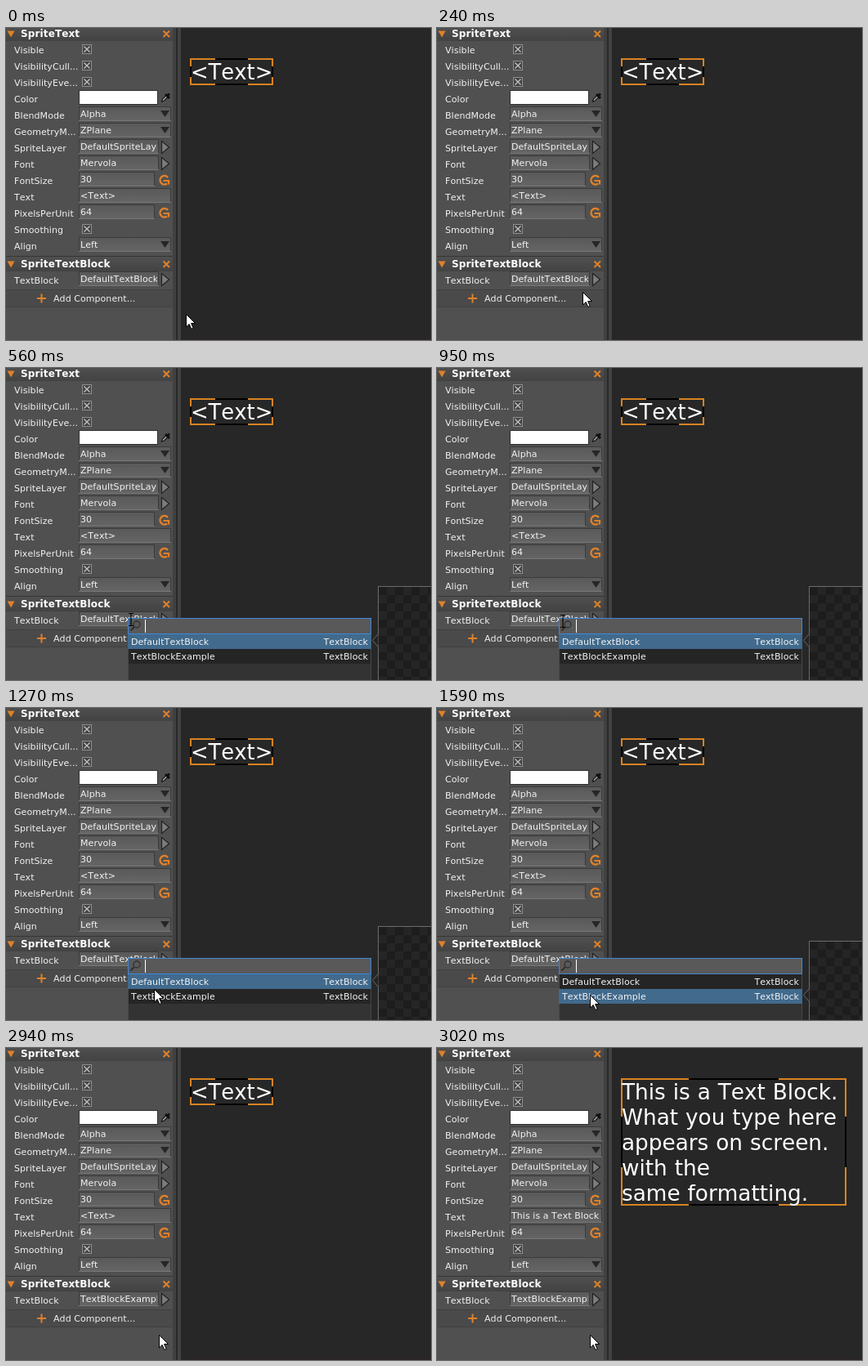
Animation of 520 by 382 pixels, one loop 3.72 s. Source, as an HTML page:

```html
<!DOCTYPE html>
<html lang="en">
<head>
<meta charset="utf-8">
<title>Text block inspector</title>
<style>
  html, body { margin: 0; width: 100%; height: 100%; overflow: hidden; background: #272727; }
  svg { display: block; }
  text { font: 11px "DejaVu Sans", sans-serif; font-kerning: none; font-variant-ligatures: none; letter-spacing: .06px; fill: #f2f2f2; white-space: pre; }
  .head { font-weight: bold; font-size: 12px; letter-spacing: .13px; fill: #fff; }
  .big { font-size: 26.3px; letter-spacing: 0; word-spacing: .6px; fill: #fff; }
  .title { font-size: 25.8px; letter-spacing: 0; fill: #fff; }
  .end { text-anchor: end; }
  .hint { fill: #a0a0a0; }
  .crisp { shape-rendering: crispEdges; }

  .anim { animation: 3720ms step-end infinite; }
  .focus { animation-name: focus; }
  .popup { animation-name: popup; }
  .typing { animation-name: typing; }
  .idle { animation-name: idle; }
  .pick { animation-name: pick; }
  .oldName { animation-name: oldName; }
  .newName { animation-name: newName; }
  .before { animation-name: before; }
  .after { animation-name: after; }
  .pointer { animation-name: pointer; }
  .arrow { animation-name: arrow; }
  .beam { animation-name: beam; }

  @keyframes focus { 0%, 15.05%, 100% { opacity: 0 } 12.9% { opacity: 1 } }
  @keyframes popup { 0%, 79.03%, 100% { opacity: 0 } 15.05% { opacity: 1 } }
  @keyframes typing { 0% { opacity: 1 } 70.43%, 100% { opacity: 0 } }
  @keyframes idle { 0% { opacity: 0 } 70.43%, 100% { opacity: 1 } }
  @keyframes pick { 0% { transform: translateY(0) } 36.29%, 100% { transform: translateY(18px) } }
  @keyframes oldName { 0% { opacity: 1 } 79.03%, 100% { opacity: 0 } }
  @keyframes newName { 0% { opacity: 0 } 79.03%, 100% { opacity: 1 } }
  @keyframes before { 0% { opacity: 1 } 81.18%, 100% { opacity: 0 } }
  @keyframes after { 0% { opacity: 0 } 81.18%, 100% { opacity: 1 } }
  @keyframes pointer {
    0% { transform: translate(220px, 350px) }
    2.15% { transform: translate(216px, 348px) }
    4.3% { transform: translate(200px, 338px) }
    6.45% { transform: translate(178px, 323px) }
    8.6% { transform: translate(160px, 311px) }
    10.75% { transform: translate(153px, 308px) }
    25.53% { transform: translate(154px, 310px) }
    27.68% { transform: translate(160px, 318px) }
    29.83% { transform: translate(168px, 328px) }
    31.98% { transform: translate(176px, 338px) }
    34.13% { transform: translate(181px, 344px) }
    36.29% { transform: translate(183px, 346px) }
    38.44% { transform: translate(184px, 348px) }
    40.59% { transform: translate(186px, 350px) }
    42.74%, 100% { transform: translate(187px, 351px) }
  }
  @keyframes arrow { 0%, 29.83%, 100% { opacity: 1 } 8.6% { opacity: 0 } }
  @keyframes beam { 0%, 29.83%, 100% { opacity: 0 } 8.6% { opacity: 1 } }
</style>
</head>
<body>
<svg id="stage" width="520" height="382" viewBox="0 0 520 382"></svg>
<script>
const ORANGE = '#e0812a';

const rect = (x, y, w, h, fill, more = '') =>
  `<rect class="crisp" x="${x}" y="${y}" width="${w}" height="${h}" fill="${fill}" ${more}/>`;
const frame = (x, y, w, h, fill, stroke) =>
  rect(x + .5, y + .5, w - 1, h - 1, fill, `stroke="${stroke}"`);
const path = (d, fill, stroke = 'none', width = 1) =>
  `<path d="${d}" fill="${fill}" stroke="${stroke}" stroke-width="${width}"/>`;
const text = (x, y, s, cls = '') =>
  `<text x="${x}" y="${y}" class="${cls}">${s.replace(/</g, '&lt;')}</text>`;
const anim = (name, body) => `<g class="anim ${name}">${body}</g>`;
const clip = (x, y, w, h, body) =>
  `<svg x="${x}" y="${y}" width="${w}" height="${h}" viewBox="${x} ${y} ${w} ${h}" overflow="hidden">${body}</svg>`;

// Inspector controls; y is the centre line of the control.
const field = (y, w, body) =>
  frame(89, y - 9, w, 18, 'url(#field)', '#3a3a3a') +
  rect(89, y + 8, w, 1, '#777') +
  clip(90, y - 8, w - 3, 16, body);
const value = (y, s) => text(91, y + 4, s);
const input = (y, w, s) => field(y, w, value(y, s));
const combo = (y, s) => input(y, 113, s) + path(`M189 ${y - 4}h11l-5.500 8z`, '#262626');
const expand = y => path(`M190.500 ${y - 6.500}v15l9-7.500z`, '#7c7c7c', '#222', 1.200);
const reset = y =>
  path(`M198 ${y - 3}A5.300 5.300 0 1 0 197 ${y + 4.500}`, 'none', ORANGE, 2.400) +
  path(`M192.500 ${y + 1}h6.500v4.500`, 'none', ORANGE, 2.200);
const check = y =>
  frame(93, y - 7, 12, 12, '#444', '#8f8f8f') +
  path(`M95.500 ${y - 4.500}l7 7m0-7l-7 7`, 'none', '#c4c4c4', 1.300);
const asset = (y, s) => input(y, 98, s) + expand(y);
const number = (y, s) => input(y, 93, s) + reset(y + 1);

const header = (y, s) =>
  rect(0, y - 9, 204, 18, 'url(#header)') +
  path(`M1.500 ${y - 3.500}h9l-4.500 8z`, ORANGE) +
  text(18, y + 4, s, 'head') +
  path(`M192.500 ${y - 3.500}l7.500 7.500m0-7.500l-7.500 7.500`, 'none', ORANGE, 2);

const swatch = y =>
  frame(89, y - 9, 97, 18, '#fff', '#303030') +
  path(`M190.500 ${y + 5}l1-3 5-5 2 2-5 5z`, '#aaa', '#161616', 1.200) +
  path(`M195 ${y - 4}l5 5M197.500 ${y - 2}l2.500-2.500`, 'none', '#111', 3);

const rows = [
  ['Visible', check], ['VisibilityCull...', check], ['VisibilityEve...', check],
  ['Color', y => swatch(y - 2)],
  ['BlendMode', y => combo(y - 2, 'Alpha')],
  ['GeometryM...', y => combo(y - 2, 'ZPlane')],
  ['SpriteLayer', y => asset(y - 2, 'DefaultSpriteLayer')],
  ['Font', y => asset(y - 2, 'Mervola')],
  ['FontSize', y => number(y - 2, '30')],
  ['Text', y => field(y - 2, 113,
    anim('before', value(y - 2, '<Text>')) + anim('after', value(y - 2, 'This is a Text Block')))],
  ['PixelsPerUnit', y => number(y - 2, '64')],
  ['Smoothing', check],
  ['Align', y => combo(y - 2, 'Left')]
];

const panel = () =>
  rect(0, 0, 204, 382, '#505050') +
  rect(204, 0, 5, 382, '#404040') + rect(208, 0, 2, 382, '#2a2a2a') + rect(210, 0, 4, 382, '#424242') +
  header(7, 'SpriteText') +
  rows.map(([label, control], i) => text(10, 31 + i * 20, label) + control(27 + i * 20)).join('') +
  rect(0, 279, 204, 1, '#353535') +
  header(289, 'SpriteTextBlock') +
  text(10, 313, 'TextBlock') +
  field(307, 98, anim('oldName', value(307, 'DefaultTextBlock')) + anim('newName', value(307, 'TextBlockExample'))) +
  expand(307) +
  anim('focus', frame(89, 298, 98, 18, 'none', '#3f86dc') + rect(91, 300, 1, 14, '#fff')) +
  rect(0, 320, 204, 1, '#404040') + rect(0, 321, 204, 20, '#4a4a4a') + rect(0, 341, 204, 1, '#404040') +
  path('M38 331h11M43.500 325.500v11', 'none', ORANGE, 2) +
  text(58, 335, 'Add Component...');

// Selection box: dark outline with bright corners covering 30% of each side.
function selection(x, y, w, h) {
  const a = w * .3, b = h * .3, r = x + w, t = y + h;
  return `<g class="crisp">` + path(`M${x} ${y}h${w}v${h}h${-w}z`, 'none', '#000', 2) +
    path(`M${x} ${y + b}V${y}h${a}M${r - a} ${y}H${r}v${b}M${r} ${t - b}V${t}h${-a}M${x + a} ${t}H${x}v${-b}`,
      'none', '#d98320', 2) + '</g>';
}

const lines = ['This is a Text Block.', 'What you type here', 'appears on screen.', 'with the', 'same formatting.'];
const scene = () =>
  anim('before', selection(226, 38, 100, 31) + text(226, 63, '<Text>', 'title')) +
  anim('after', selection(226, 38, 274, 154) +
    lines.map((s, i) => text(226, 63 + i * 31, s, 'big')).join('')) +
  rect(214, 381, 306, 1, '#30262a');

const option = (y, s) => text(153, y, s) + text(443, y, 'TextBlock', 'end');
const lens = '<circle cx="160" cy="314" r="4" fill="none" stroke="#303030" stroke-width="1.300"/>' +
  path('M157 317l-4.500 4.500', 'none', '#303030', 2);
const popup = () =>
  frame(149, 306, 298, 80, '#252525', '#484848') +
  rect(150, 362, 296, 20, '#333') +
  anim('typing', frame(149, 306, 298, 20, '#595959', '#3f86dc') + lens + rect(170, 308, 1, 16, '#fff')) +
  anim('idle', frame(149, 306, 298, 20, '#555', '#3a3a3a') + lens + text(170, 319, 'search...', 'hint')) +
  anim('pick',
    rect(149, 326, 298, 18, '#416a8c') +
    frame(455, 267, 80, 140, 'url(#checker)', '#6c6c6c') +
    path('M455.500 325.500l-7 8 7 8', '#222', '#6c6c6c')) +
  option(339, 'DefaultTextBlock') + option(357, 'TextBlockExample');

const pointer = () => anim('pointer',
  anim('arrow', path('M.5 .5v15.500l3.700-3.500 2.600 6 2.400-1-2.600-5.900h5z', '#fff', '#000')) +
  anim('beam', path('M-3 -7.500h2.500l.5.5.5-.5h2.500M0-7v14M-3 7.500h2.500l.5-.5.5.5h2.500', 'none', '#000', 1.200)));

const gradient = (id, from, to) =>
  `<linearGradient id="${id}" x2="0" y2="1"><stop stop-color="${from}"/><stop offset="1" stop-color="${to}"/></linearGradient>`;
const defs = '<defs>' + gradient('field', '#595959', '#656565') + gradient('header', '#505050', '#434343') +
  '<pattern id="checker" x="456" y="268" width="20" height="20" patternUnits="userSpaceOnUse">' +
  rect(0, 0, 20, 20, '#252525') + rect(0, 0, 10, 10, '#1d1d1d') + rect(10, 10, 10, 10, '#1d1d1d') +
  '</pattern></defs>';

document.getElementById('stage').innerHTML =
  defs + rect(0, 0, 520, 382, '#272727') + panel() + scene() + anim('popup', popup()) + pointer();
</script>
</body>
</html>
```
